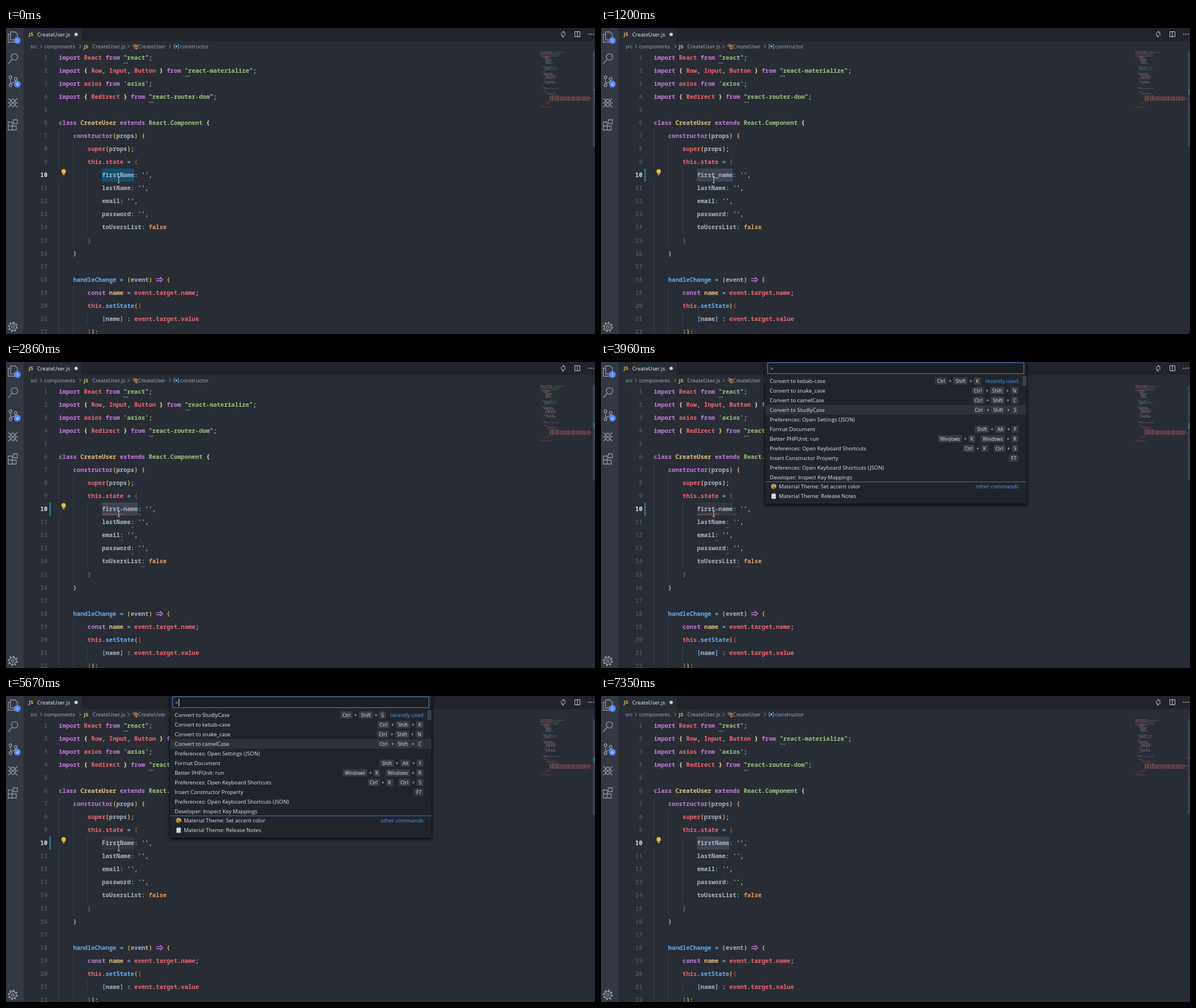
An HTML page for the animation above (7930 ms loop, 1037 by 540 pixels).

```html
<!DOCTYPE html>
<html lang="en">
<head>
<meta charset="utf-8">
<title>Case conversion in an editor</title>
<style>
  html, body { margin: 0; width: 100%; height: 100%; overflow: hidden; background: #282c34; }
  body { position: relative; font: 9.45px "Open Sans", "Noto Sans", sans-serif; }
  svg { position: absolute; left: 0; top: 0; }
  .mono { font: 700 10.545px "Noto Sans Mono", "DejaVu Sans Mono", monospace; }
  .line { fill: none; stroke: #8f96a5; stroke-width: 1.3; }
  #palette { position: absolute; left: 289px; top: 0; width: 460px; height: 250px;
    background: #21252b; color: #dfe2e8; box-shadow: 0 2px 6px #000; }
  #input { position: absolute; left: 4px; top: 1px; width: 450px; height: 18px; line-height: 20px;
    border: 1px solid #4d7fe0; background: #1b1e24; text-indent: 4px; }
  #input b { position: absolute; left: 10px; top: 3px; width: 1px; height: 13px; background: #e4e7ee; }
  #rows { position: absolute; top: 25.5px; width: 100%; }
  .row { display: flex; align-items: center; height: 16.92px; padding: 0 14px 0 8px; white-space: pre; }
  .row span { flex: 1; }
  .row svg { position: static; margin: 0 4px 0 2px; }
  .selected { background: #2c313a; }
  .other { box-shadow: inset 0 1px #4a6bb5; line-height: 18px; }
  .chord { display: flex; margin-left: 9px; font-size: 8.3px; line-height: 13px; }
  .chord kbd { font: inherit; padding: 0 3.8px; border-radius: 2px; background: #353941; }
  .chord i { width: 11px; text-align: center; font-style: normal; }
  .note { margin-left: 7px; color: #4e9bee; }
  #thumb { position: absolute; right: 0; top: 25px; width: 7px; height: 17px; background: #3b404a; }
</style>
</head>
<body>
<svg id="editor" width="1037" height="540"></svg>
<svg id="live" width="1037" height="540"></svg>
<div id="palette">
  <div id="input">&gt;<b id="caret"></b></div>
  <div id="rows"></div>
  <div id="thumb"></div>
</div>
<script>
const LOOP = 7930, LEFT = 93, CHAR = 6.327, PITCH = 23.05;
const colors = { p: '#c678dd', r: '#ef636f', g: '#98c379', w: '#abb2bf', y: '#e5c07b', o: '#e8995a',
  b: '#61afef', c: '#56b6c2', l: '#f0dfa8', k: '#e8b04a', n: '#96603b' };
const $ = id => document.getElementById(id);
const column = n => LEFT + n * CHAR;
const rowTop = n => 248 + (n - 10) * PITCH;
const rect = (x, y, w, h, fill, more = '') =>
  `<rect x="${x}" y="${y}" width="${w}" height="${h}" fill="${fill}" ${more}/>`;
const circle = (x, y, r, fill) => `<circle cx="${x}" cy="${y}" r="${r}" fill="${fill}"/>`;
const path = (d, more = 'class="line"') => `<path d="${d}" ${more}/>`;
const text = (x, y, s, fill, more = '') => `<text x="${x}" y="${y}" fill="${fill}" ${more}>${s}</text>`;
const stroke = (color, width) => `fill="none" stroke="${color}" stroke-width="${width}"`;

// Each line: indent, then pieces introduced by ~ and a colour key.
const code = [
  [0, '~pimport ~rReact ~pfrom ~g"react"~w;'],
  [0, '~pimport ~l{ ~rRow~w, ~rInput~w, ~rButton ~l} ~pfrom ~g"react-materialize"~w;'],
  [0, "~pimport ~raxios ~pfrom ~g'axios'~w;"],
  [0, '~pimport ~l{ ~rRedirect ~l} ~pfrom ~g"react-router-dom"~w;'],
  [0, ''],
  [0, '~pclass ~yCreateUser ~pextends ~gReact~w.~gComponent ~l{'],
  [4, '~pconstructor~k(~wprops~k) ~o{'],
  [8, '~rsuper~k(~wprops~k)~w;'],
  [8, '~rthis~w.~rstate ~c= ~n{'],
  null,
  [12, "~wlastName~c: ~g''~w,"],
  [12, "~wemail~c: ~g''~w,"],
  [12, "~wpassword~c: ~g''~w,"],
  [12, '~wtoUsersList~c: ~ofalse'],
  [8, '~n}'],
  [4, '~o}'],
  [0, ''],
  [4, '~bhandleChange ~c= ~k(~wevent~k)    ~o{'],
  [8, '~pconst ~yname ~c= ~revent~w.~rtarget~w.~rname~w;'],
  [8, '~rthis~w.~bsetState~k(~n{'],
  [12, '~b[~wname~b] ~w: ~revent~w.~rtarget~w.~rvalue'],
  [8, '~n}~k)~w;'],
];
// Lines further down the file: number, indent, length, colour.
const below = [
  [23, 4, 1, 'o'], [25, 4, 25, 'b'], [26, 8, 20, 'w'], [27, 8, 26, 'b'], [28, 12, 20, 'r'],
  [29, 12, 26, 'w'], [30, 12, 20, 'w'], [31, 12, 24, 'r'], [32, 8, 4, 'o'], [34, 8, 22, 'b'],
  [35, 12, 24, 'w'], [36, 12, 22, 'r'], [37, 8, 3, 'n'], [38, 4, 1, 'o'], [41, 4, 10, 'b'],
  [42, 8, 36, 'p'], [45, 8, 8, 'p'], [47, 12, 26, 'r'], [48, 16, 18, 'r'], [57, 16, 8, 'r'],
  [58, 12, 6, 'r'], [59, 8, 2, 'k'], [60, 4, 1, 'o'], [62, 0, 25, 'r'],
];

function codeLine(number, indent, markup) {
  let out = '', col = indent;
  for (const piece of markup.split('~').slice(1)) {
    const fill = colors[piece[0]], s = piece.slice(1), width = s.trimEnd().length;
    out += text(column(col), 55.8 + (number - 1) * PITCH, s, fill, 'class="mono"');
    out += mini(number, col, width, fill);
    col += s.length;
  }
  return out;
}
function mini(number, col, width, color) {
  return path(`M${941 + col * .76} ${41.5 + (number - 1) * 1.6}h${width * .76}`,
    stroke(color, .9) + ' opacity=".5" stroke-dasharray="2.6 .9 4.4 1.3"');
}

function wave(x, y, width) {
  let d = `M${x} ${y}`;
  for (let i = 1; i * 1.9 <= width; i++) d += `L${x + i * 1.9} ${y + (i % 2 ? -1.8 : 0)}`;
  return path(d, stroke('#d25a48', .9));
}

function activityBar() {
  const badge = (y, n) => circle(20, y, 5.9, '#568af2') + text(20, y + 2.8, n, '#fff', 'font-size="7.5" text-anchor="middle"');
  return rect(0, 0, 31, 540, '#333842') +
    path('M8 7h8l4 4v10h-12zM8 11h-4v14h11v-4') + badge(22, 1) +
    '<circle class="line" cx="15" cy="51" r="5.6"/>' + path('M11 55l-7 8') +
    '<circle class="line" cx="8" cy="87" r="2.5"/><circle class="line" cx="8" cy="101" r="2.5"/><circle class="line" cx="17" cy="90" r="2.5"/>' +
    path('M8 90v8M17 93q-1 3-8 4') + badge(99, 4) +
    '<ellipse class="line" cx="12" cy="132" rx="4.7" ry="6.5"/>' +
    path('M4 124l4 4M20 124l-4 4M3 132h4M17 132h4M4 140l4-4M20 140l-4-4M8 128l8 8M16 128l-8 8') +
    path('M4 166h7v7h7v7h-14zM4 173h7v7M13 162h7v7h-7z') +
    '<circle class="line" cx="12" cy="527.5" r="6"/><circle class="line" cx="12" cy="527.5" r="2.3"/>' +
    '<circle class="line" cx="12" cy="527.5" r="7.8" style="stroke-width:2.4;stroke-dasharray:3.06 3.06"/>';
}

function header() {
  const grey = '#a3abba', light = stroke('#c5c8cf', 1);
  const crumb = (x, s) => text(x, 36, s, grey, 'font-size="9.35"');
  const js = (x, y) => text(x, y, 'JS', '#e3bd4b', 'font-size="9" font-weight="700"');
  return rect(31, 0, 1006, 23, '#21252b') + rect(31, 0, 102, 23, '#282c34') +
    js(40, 14) + text(55, 14.5, 'CreateUser.js', '#eceef2', 'font-size="9.3"') + circle(123.5, 11.3, 3, '#c5c8cf') +
    crumb(43, 'src') + crumb(67, 'components') + js(137, 36) + crumb(152, 'CreateUser.js') +
    crumb(232, 'CreateUser') + crumb(306.5, 'constructor') +
    [60, 129, 214, 287].map(x => path(`M${x} 29.5l3 3l-3 3`, stroke(grey, .9))).join('') +
    path('M223 31l3-3l2 2l-3 3zM226 32h3M227 32v4h2M229 30h2v3h-2zM229 35h2v2h-2z', stroke('#e89a4b', 1)) +
    path('M298 29h-2v7h2M302 29h2v7h-2', stroke('#75beff', .9)) + circle(300, 32.5, 1.8, '#75beff') +
    path('M978 8v5q0 2 2 2h2M984 14v-5q0-2-2-2h-2M982 5l-2 2l2 2M980 13l2 2l-2 2', light) +
    path('M1001.5 6.5h9v9h-9zM1006 6.5v9', light) +
    [1026, 1030, 1034].map(x => circle(x, 11, 1, '#c5c8cf')).join('');
}

function editor() {
  const guide = (x, from, to) => rect(x, rowTop(from), 1, rowTop(to + 1) - rowTop(from), '#3b4048');
  let out = activityBar() + header();
  out += guide(93, 7, 23) + guide(118, 8, 15) + guide(118, 19, 23) + guide(143, 10, 14) + guide(143, 21, 21);
  code.forEach((line, i) => {
    out += text(73, 55.8 + i * PITCH, i + 1, i == 9 ? '#d7dae0' : '#495162', 'class="mono" text-anchor="end"');
    if (line) out += codeLine(i + 1, ...line);
  });
  out += path('M264.5 442.3h9M264.5 446h9M271 439.5l5 4.7l-5 4.7', stroke(colors.p, 1.3));
  for (const [x, y] of [[207, 62], [316, 85], [252, 131]])
    for (let i = 0; i < 3; i++) out += rect(x + i * 3, y - .7, 1.4, 1.4, '#b5bac4');
  for (const [n, indent, width, key] of below) out += mini(n, indent, width, colors[key]);
  for (let n = 50; n < 56; n++) out += mini(n, 21, n == 50 ? 24 : 92 + n % 3 * 4, colors[n % 2 ? 'r' : 'y']);
  return out + rect(1033, 41, 4, 168, '#3c414b');
}

const convert = {
  C: ['Convert to camelCase', 'Ctrl+Shift+C'],
  N: ['Convert to snake_case', 'Ctrl+Shift+N'],
  K: ['Convert to kebab-case', 'Ctrl+Shift+K'],
  S: ['Convert to StudlyCase', 'Ctrl+Shift+S'],
};
const icon = shape => `<svg width="10" height="11">${shape}</svg>`;
const commands = [
  ['Preferences: Open Settings (JSON)'],
  ['Format Document', 'Shift+Alt+F'],
  ['Better PHPUnit: run', 'Windows+K Windows+R'],
  ['Preferences: Open Keyboard Shortcuts', 'Ctrl+K Ctrl+S'],
  ['Insert Constructor Property', 'F7'],
  ['Preferences: Open Keyboard Shortcuts (JSON)'],
  ['Developer: Inspect Key Mappings'],
  ['Material Theme: Set accent color', '', icon(circle(5, 5.5, 4.6, '#d9a441') + circle(3, 5, 1, '#b5443c') +
    circle(6, 3, 1, '#4a8ad0') + circle(6, 8, 1.5, '#21252b')) + ' '],
  ['Material Theme: Release Notes', '', icon(rect(1, 1.5, 8, 9, '#b9b2ab') + rect(2, 2.5, 6, 7, '#eceff3') +
    rect(3, .5, 4, 2, '#9aa3b0') + rect(3, 5, 4, .8, '#8d96a5') + rect(3, 7, 4, .8, '#8d96a5'))],
];
const chord = keys => `<div class="chord">${keys.split('+').map(k => `<kbd>${k}</kbd>`).join('<i>+</i>')}</div>`;

function paletteRows(order, selected) {
  return [...[...order].map(k => convert[k]), ...commands].map(([label, keys, mark = ''], i) => {
    const note = { 0: 'recently used', 11: 'other commands' }[i];
    return `<div class="row ${i == selected ? 'selected' : ''} ${i == 11 ? 'other' : ''}">${mark}<span>${label}</span>` +
      (keys ? keys.split(' ').map(chord).join('') : '') + (note ? `<div class="note">${note}</div>` : '') + '</div>';
  }).join('');
}

function live({ at, name, order }) {
  const modified = name != 'firstName', broken = name == 'first-name', x = column(12);
  const fill = at < 1200 ? (order ? '#11496a' : '#124f73') : order ? '#323740' : '#3e4451';
  let out = rect(x, 248, name.length * CHAR, 23, fill, 'rx="2"') + codeLine(10, 12, `~w${name}~c: ~g''~w,`);
  if (modified) out += rect(76.5, 248, 2.2, 23, '#1f85a6') + rect(1034, 108, 3, 9, '#1c7190');
  out += rect(1034, 108, 3, 2, '#2f74b5');
  if (broken) {
    out += wave(x, 269.8, 38);
    [name, 'lastName', 'email', 'password', 'toUsersList'].forEach((s, i) =>
      out += wave(x + s.length * CHAR, 269.8 + i * PITCH, 6));
  }
  if (!(broken && order)) out += rect(93, 248, 15, 23, '#282c34') + circle(101.5, 253, 3.9, '#ecb92f') +
    rect(99.8, 255, 3.4, 2.4, '#ecb92f') + rect(99.8, 258, 3.4, 1.4, '#c9ccd2');
  if (at == 6800) out += rect(225.5, 248, 1.4, 23, '#528bff');
  if (at < 7350) {
    const [mx, my] = at < 6800 ? [198.5, 268] : [881.5, 460.5];
    out += path(`M${mx - 2.3} ${my - 5}h4.6M${mx} ${my - 5}v10M${mx - 2.3} ${my + 5}h4.6`, stroke('#d0d3d9', .9));
  }
  return out;
}

// Start time, identifier, then command order, selected row and input caret while the palette is open.
const steps = [
  [0, 'firstName'], [100, 'firstName', 'CNKS', 0, 1], [650, 'firstName', 'CNKS', 1, 1],
  [1200, 'first_name'], [1760, 'first_name', 'NCKS', 0, 0], [2310, 'first_name', 'NCKS', 2, 0],
  [2860, 'first-name'], [3410, 'first-name', 'KNCS', 0, 1], [3960, 'first-name', 'KNCS', 3, 0],
  [4540, 'FirstName'], [5100, 'FirstName', 'SKNC', 0, 1], [5670, 'FirstName', 'SKNC', 3, 1],
  [6230, 'firstName'], [6800, 'firstName'], [7350, 'firstName'],
].map(([at, name, order, selected, caret]) => ({ at, name, order, selected, caret }));

let shown;
function draw() {
  const t = performance.now() % LOOP;
  const step = steps.findLast(s => s.at <= t);
  if (step != shown) {
    shown = step;
    $('live').innerHTML = live(step);
    $('palette').hidden = !step.order;
    if (step.order) $('rows').innerHTML = paletteRows(step.order, step.selected);
    $('caret').hidden = !step.caret;
  }
  requestAnimationFrame(draw);
}
$('editor').innerHTML = editor();
draw();
</script>
</body>
</html>
```
